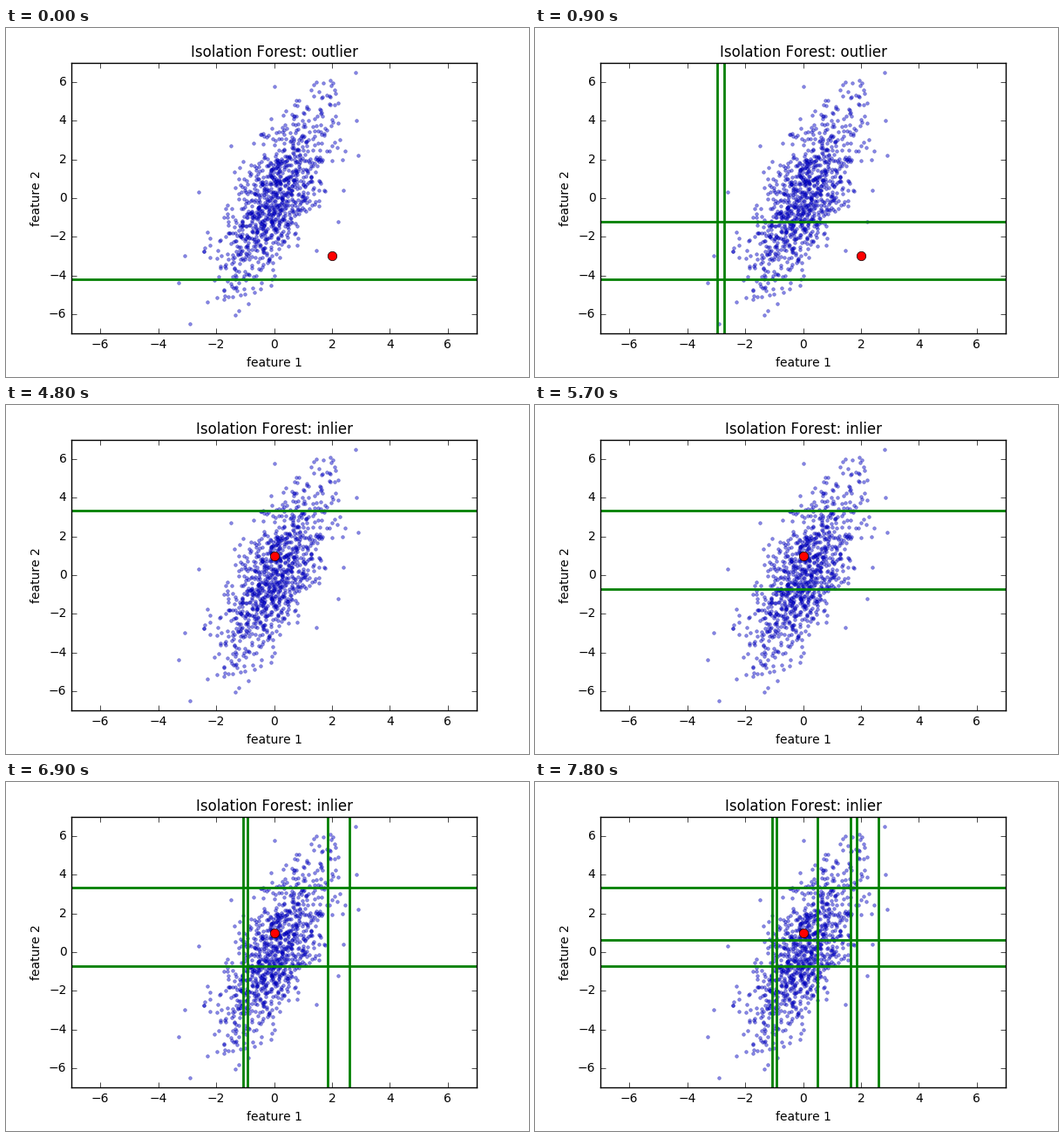
Animation of 600 by 400 pixels, one loop 8000 ms. Source, as a matplotlib script:

```python
import numpy as np
import matplotlib.pyplot as plt
from matplotlib.animation import FuncAnimation

STEP = 100
CUT_TIME = 300
LOOP = 8000
NOTE_START = 1800
SWITCH = 4800
LIMIT = 7

plt.rcParams.update({
    "font.family": "DejaVu Sans", "font.size": 10,
    "text.kerning_factor": 6,
    "axes.linewidth": 1.0, "axes.axisbelow": False,
    "axes.labelpad": 5, "axes.titlepad": 5, "axes.titlesize": 12,
    "xtick.direction": "in", "ytick.direction": "in",
    "xtick.top": True, "ytick.right": True,
    "xtick.major.size": 4, "ytick.major.size": 4,
    "xtick.major.width": 0.5, "ytick.major.width": 0.5,
    "xtick.major.pad": 4, "ytick.major.pad": 4,
    "ytick.alignment": "center",
})

# One cut every CUT_TIME; a cut beyond LIMIT falls outside the view
OUTLIER_CUTS = "h-4.22 h-1.197 v-2.98 v-2.71 v2.168 v1.867"
INLIER_CUTS = ("h3.32 h7.5 h-0.745 h-7.5 v2.59 v-1.054 "
               "v1.837 v-0.93 v1.626 h0.61 v0.506")


def cloud(n=1000, reach=2.65):
    """Correlated normal cloud, with a few strays placed beyond its reach."""
    rng = np.random.RandomState(4)
    u, v = rng.randn(2, n)
    core = np.hypot(u, v) < reach
    x, y = u[core], 1.68 * u[core] + 1.75 * v[core]
    strays = [(-3.1, -3.0), (-3.3, -4.4), (-2.9, -6.5), (-2.6, 0.3),
              (-1.5, 2.7), (0, 5.8), (2.8, 6.5), (2.85, 4), (2.9, 2.2),
              (2.4, 0.4), (2.2, -1.2), (1.45, -2.7)]
    return np.vstack([np.column_stack([x, y]), strays]).T


def add_cuts(spec, start, end):
    """Draw the cuts and pair each line with the time it is visible."""
    cuts = []
    for k, cut in enumerate(spec.split()):
        draw = ax.axhline if cut[0] == "h" else ax.axvline
        line = draw(float(cut[1:]), color="green", lw=2)
        cuts.append((line, start + k * CUT_TIME, end))
    return cuts


fig = plt.figure(figsize=(6, 4), dpi=100, facecolor="white")
ax = fig.add_axes([0.125, 0.125, 0.775, 0.775])
ticks = range(1 - LIMIT, LIMIT, 2)
ax.set(xlim=(-LIMIT, LIMIT), ylim=(-LIMIT, LIMIT), xticks=ticks, yticks=ticks,
       xlabel="feature 1", ylabel="feature 2")
title = ax.set_title("")

ax.plot(*cloud(), ".", color=(0, 0, 0.82), ms=5.2,
        mec=(0, 0, 0.6), mew=0.5, alpha=0.45)
dot, = ax.plot([], [], "o", color="r", ms=7.5, mec="k", mew=0.5)
note = ax.text(-6.5, 6, "isolation number = 6")
cuts = add_cuts(OUTLIER_CUTS, 0, SWITCH) + add_cuts(INLIER_CUTS, SWITCH, LOOP)


def update(i):
    t = i * STEP
    kind, x, y = ("outlier", 2, -3) if t < SWITCH else ("inlier", 0, 1)
    title.set_text("Isolation Forest: " + kind)
    dot.set_data([x], [y])
    note.set_visible(NOTE_START <= t < SWITCH)
    for line, start, end in cuts:
        line.set_visible(start <= t < end)
    return [title, dot, note] + [line for line, _, _ in cuts]


anim = FuncAnimation(fig, update, frames=LOOP // STEP, interval=STEP,
                     repeat=True, repeat_delay=0, blit=False)
plt.show()
```
